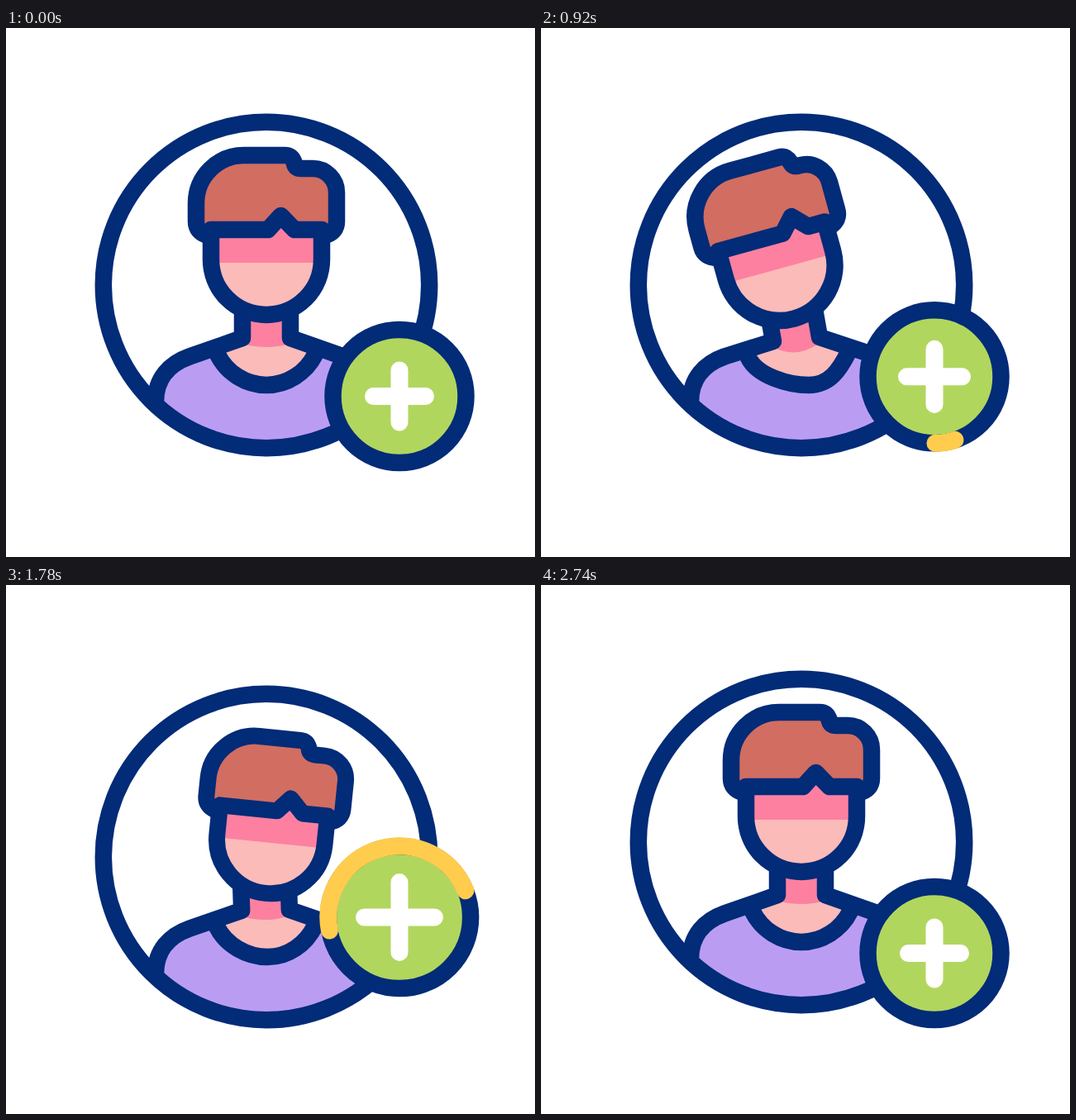
Animation of 640x640 px, one loop 3000 ms. Source, as an HTML page:

```html
<!DOCTYPE html>
<html lang="en">
<head>
<meta charset="utf-8">
<title>Add user</title>
<style>
  html, body { margin: 0; width: 100%; height: 100%; overflow: hidden; background: #fff; }
  svg { display: block; width: 100%; height: 100%; }
  .line { fill: none; stroke: #022b78; stroke-width: 20.5; stroke-linejoin: round; }
  .skin { fill: #fbbbb9; }
  .shade { fill: #fd80a0; }
</style>
</head>
<body>
<svg viewBox="0 0 640 640">
  <clipPath id="disc"><circle cx="315" cy="311" r="197"/></clipPath>
  <g id="user">
    <g clip-path="url(#disc)">
      <path id="shirt" fill="#ba9df2"/>
    </g>
    <path id="chest" class="skin"/>
    <path id="neck" class="shade"/>
    <path id="shoulders" class="line"/>
    <path id="collar" class="line" stroke-linecap="round"/>
    <circle class="line" cx="315" cy="311" r="197.2"/>
    <g id="head">
      <path class="skin" d="M248 240V280A67 67 0 0 0 382 280V240Z"/>
      <path class="shade" d="M248 240H382V284H248Z"/>
      <path class="line" d="M248 240V280A67 67 0 0 0 382 280V240"/>
      <path id="hair" class="line" style="fill:#d26d61"/>
    </g>
  </g>
  <g id="badge">
    <circle id="ring" class="line" style="fill:#b1d65e"/>
    <path id="progress" fill="none" stroke="#ffcc4e" stroke-width="21" stroke-linecap="round"/>
    <path id="plus" stroke="#fff" stroke-width="21" stroke-linecap="round"/>
  </g>
</svg>
<script>
const LOOP = 3000;
const $ = id => document.getElementById(id);
const set = (id, name, value) => $(id).setAttribute(name, value);
const mix = (a, b, k) => a + (b - a) * k;
const clamp = x => Math.min(1, Math.max(0, x));
const smooth = x => x * x * (3 - 2 * x);

// Eased value at time t from [time, value] keys.
function track(t, ...keys) {
  let value = keys[0][1];
  for (let i = 1; i < keys.length; i++) {
    const [t0, v0] = keys[i - 1], [t1, v1] = keys[i];
    if (t >= t0) value = mix(v0, v1, smooth(clamp((t - t0) / (t1 - t0))));
  }
  return value;
}

// The neck and collar follow the head when it leans left.
function drawBody(lean) {
  const at = (x0, y0, x1, y1) => [mix(x0, x1, lean), mix(y0, y1, lean)];
  const topL = at(286, 340, 274, 340), baseL = at(286, 375, 281, 379);
  const topR = at(344, 340, 331, 340), baseR = at(344, 375, 337, 374);
  const endL = at(256, 395, 251, 399), endR = at(374, 395, 372, 392);
  const [lowX, lowY] = at(315, 432, 324, 432);
  const curve = `${endL}C${endL[0] + 11} ${endL[1] + 22} ${lowX - 25} ${lowY} ${lowX} ${lowY}` +
    `S${endR[0] - 11} ${endR[1] + 22} ${endR}`;
  const left = `M181 452C181 424 198 406 222 397.5L${baseL}`;
  const right = `${baseR}L408 397.5C432 406 449 424 449 452`;
  const shadeX = (baseL[0] + baseR[0]) / 2, shadeY = baseL[1] + 15 + 7 * lean;

  set('shirt', 'd', `${left}L${right}V520H181Z`);
  set('shoulders', 'd', `${left}L${topL}M${topR}L${right}`);
  set('collar', 'd', 'M' + curve);
  set('chest', 'd', `M${topL}L${baseL}L${curve}L${baseR}L${topR}Z`);
  set('neck', 'd', `M${topL}L${baseL}v7Q${shadeX} ${shadeY} ${baseR[0]} ${baseR[1] + 7}L${topR}Z`);
}

// The parting and the fringe slide sideways by shift.
function drawHair(shift) {
  const x = value => value + shift;
  set('hair', 'd', `M244 251Q230 247 230 234V212A58 58 0 0 1 288 154H${x(337)}
    Q${x(346)} 154 ${x(349)} 164Q${x(350)} 170 ${x(357)} 170H371A29 29 0 0 1 400 199V234
    Q400 247 386 251L382 244H${x(349)}L${x(332.5)} 227L${x(317)} 244H248Z`);
}

function drawProgress(t, r) {
  const from = track(t, [1600, 0], [2130, 1]);
  const to = clamp((t - 790) / 1240) ** 1.35;
  if (to - from < 0.001) return set('progress', 'd', '');
  const point = k => {
    const a = (72 + 360 * k) * Math.PI / 180;
    return [r * Math.cos(a), r * Math.sin(a)];
  };
  const middle = (from + to) / 2;
  set('progress', 'd', `M${point(from)}A${r} ${r} 0 0 1 ${point(middle)}A${r} ${r} 0 0 1 ${point(to)}`);
}

function draw(t) {
  const left = track(t, [200, 0], [920, 1], [1440, 1], [1900, 0]);
  const right = track(t, [1440, 0], [1900, 1], [2300, 1], [2740, 0]);
  const drop = track(t, [1520, 0], [1920, 25], [2320, 0]);
  const x = 315 - 26.5 * left + 12 * right, y = 280 + 7 * left + 8.5 * right;
  const angle = 10 * right - 15.4 * left;
  const size = 1 - 0.175 * left * right;
  set('user', 'transform', `translate(0 ${drop})`);
  set('head', 'transform',
    `translate(${x} ${y}) rotate(${angle}) translate(0 67) scale(${size}) translate(-315 -347)`);
  drawHair(12 * left);
  drawBody(left);

  const badgeY = track(t, [200, 445.5], [560, 465.5], [1135, 402], [2010, 402], [2450, 445.5]);
  const r = track(t, [1040, 80.5], [1460, 99], [1540, 99], [1920, 80.5]);
  const arm = track(t, [800, 31.5], [1240, 42.5], [1760, 42.5], [2200, 31.5]);
  set('badge', 'transform', `translate(476 ${badgeY})`);
  set('ring', 'r', r);
  set('plus', 'd', `M${-arm} 0H${arm}M0 ${-arm}V${arm}`);
  drawProgress(t, r);
}

function tick() {
  draw(performance.now() % LOOP);
  requestAnimationFrame(tick);
}
tick();
</script>
</body>
</html>
```
